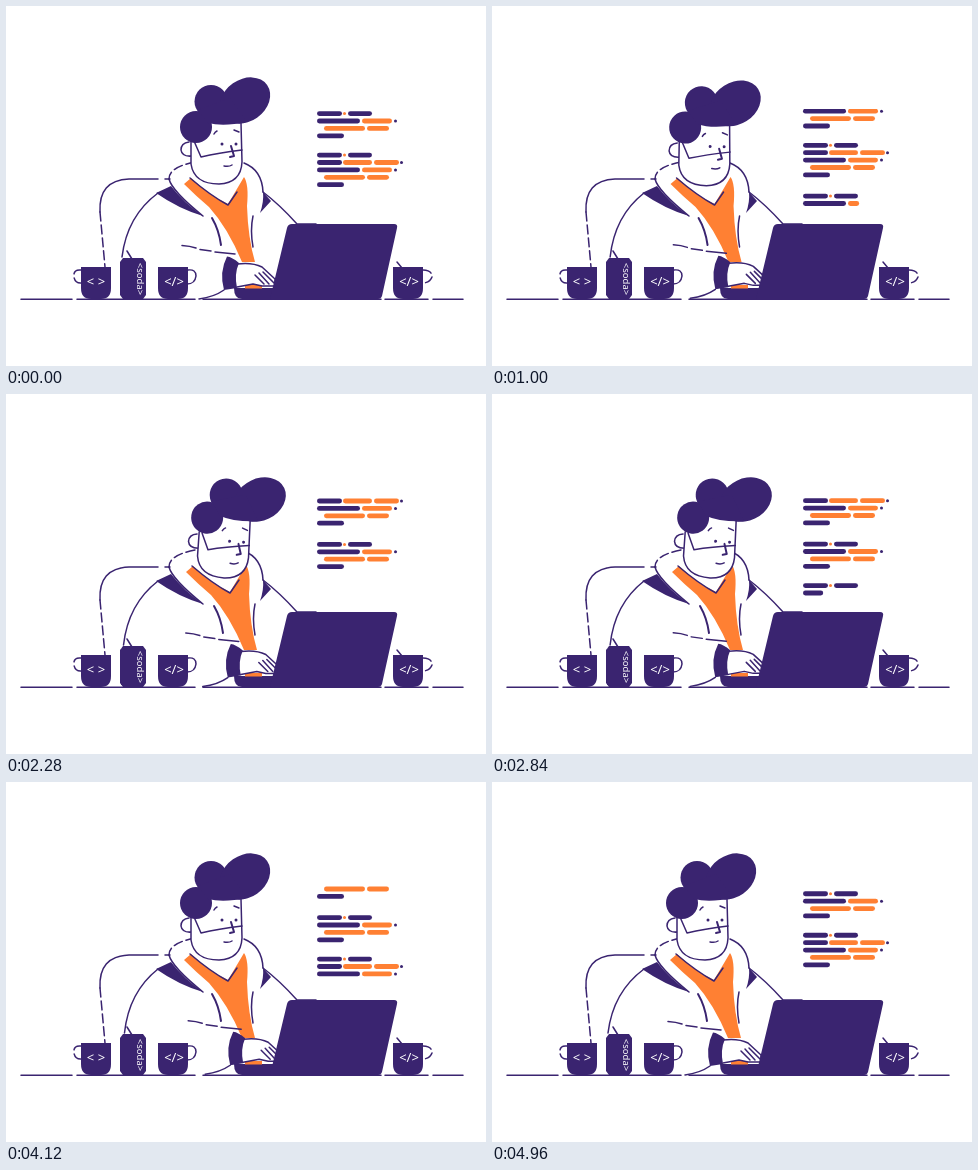
Animation, 480 px wide and 360 px high, one loop 5000 ms. Source, as an HTML page:

```html
<!DOCTYPE html>
<html lang="en">
<head>
<meta charset="utf-8">
<title>Coding at the desk</title>
<style>
  html, body { margin: 0; width: 100%; height: 100%; overflow: hidden; background: #fff; }
  svg { display: block; width: 100vw; height: 100vh; }
  .line { fill: none; stroke: #3a2470; stroke-width: 1.5; stroke-linecap: round; stroke-linejoin: round; }
  .bold { stroke-width: 2; }
  .skin { fill: #fff; }
  .dark { fill: #3a2470; }
  .warm { fill: #ff8033; }
  .gaps { stroke-dasharray: 9 4; }
  text { fill: #fff; font-family: "Noto Sans", "Open Sans", sans-serif; text-anchor: middle; }
</style>
</head>
<body>
<svg viewBox="0 0 480 360">
  <defs>
    <clipPath id="pane"><rect x="300" y="103" width="110" height="115"/></clipPath>
    <path id="cup" d="M0 0H30V21Q30 32 20 32H10Q0 32 0 21Z"/>
  </defs>

  <g clip-path="url(#pane)"><g id="code"></g></g>

  <!-- chair and desk -->
  <path class="line" d="M94 206C93 185 102 174 123 173H152M159 173H164"/>
  <path class="line gaps" d="M94 206L99 261"/>
  <path class="line" d="M15 293.300H66M71 293.300H189M197 293.300H375M379 293.300H422M427 293.300H457"/>

  <!-- jacket -->
  <path id="back" class="line"/>
  <path class="line" d="M257 186Q274 199 291 218H310"/>
  <path class="dark" d="M150 187L165 180Q178 197 197 210Q173 203 150 187Z"/>
  <path class="dark" d="M257 186L265 195L254 207Q258 196 257 186Z"/>
  <g id="chest">
    <path class="warm" d="M178 178L185 172Q204 190 222 198L238 171Q243 178 241 200Q242 232 249 256H236Q222 222 203 201Q190 190 178 178Z"/>
    <path class="line" d="M184 172Q205 190 222 199L231 186"/>
    <path class="line bold" d="M206 212Q213 224 215 239"/>
    <path class="line" d="M247 210Q244 224 247 241"/>
  </g>
  <path class="line gaps" d="M189 156Q163 161 163 173"/>
  <path class="line" d="M163 173Q166 185 197 210M238 157Q256 164 257 186"/>

  <g id="face">
    <path class="line skin" style="fill:#fff" d="M183 136Q175 137 175 144Q176 151 186 150"/>
    <path class="line" style="fill:#fff" d="M185 134V158Q188 178 213 178Q235 177 236 156L235 117"/>
    <path class="line" d="M188 135L195 151Q212 147 236 144"/>
    <g id="look">
      <path class="line" d="M208 128Q209 126 211 125M228 124L233 126M218 160Q223 161 226 159"/>
      <path class="line bold" d="M225 140L228 150L224 151"/>
      <circle class="dark" cx="216" cy="138" r="1.5"/>
      <circle class="dark" cx="230" cy="138" r="1.5"/>
    </g>
  </g>
  <g id="hair" class="dark">
    <circle cx="190" cy="121" r="16"/>
    <circle cx="205" cy="95.5" r="16.5"/>
    <ellipse cx="239" cy="94.500" rx="27" ry="21" transform="rotate(-35 239 94.500)"/>
    <path d="M192 104L224 92L241 116Q217 121 202 117Z"/>
  </g>

  <!-- laptop base sits below the hand -->
  <path class="dark" d="M228 282H270V293H236Q228 293 228 282Z"/>
  <path class="warm" d="M239 279H256V282.5H239Z"/>
  <g id="arm">
    <path class="skin" d="M190 243L221 249L218 284L196 292Z"/>
    <path class="line" d="M176 239.500Q184 240 190 242M194 243.500L205 245M209 246L229 248"/>
    <path class="line" d="M218 284Q208 291 193 293"/>
    <path class="line" style="fill:#fff" d="M231 258Q246 256 256 261L269 273V280H256L247 278L231 281"/>
    <path class="line" d="M249 269L258 278M253 267L263 278M257 266L268 277"/>
    <path class="dark" d="M221 250.500Q226 251 233 257Q228 268 231 282L218 284Q213 266 221 250.500Z"/>
  </g>
  <path class="dark" d="M286 218H388Q392 218 391 222L376 290Q375 293 372 293H264L281 222Q282 218 286 218Z"/>

  <!-- drinks -->
  <path class="line gaps" d="M75 264Q67 263 68 271Q69 278 77 277"/>
  <path class="line" d="M182 264Q190 263 190 270Q189 278 181 278M391 256L396 262M121 245L126 253"/>
  <path class="line gaps" d="M417 264Q426 264 426 271Q424 277 416 277"/>
  <use href="#cup" class="dark" x="75" y="261"/>
  <use href="#cup" class="dark" x="152" y="261"/>
  <use href="#cup" class="dark" x="387" y="261"/>
  <path class="dark" d="M117 252H137L140 256V289L137 293H117L114 289V256Z"/>
  <text x="90" y="280" font-size="13">&lt; &gt;</text>
  <text x="168" y="280" font-size="13">&lt;/&gt;</text>
  <text x="403" y="280" font-size="13">&lt;/&gt;</text>
  <text font-size="9.5" transform="translate(131 273) rotate(90)">&lt;soda&gt;</text>
</svg>
<script>
const LOOP = 5000, PERIOD = 92.3, ROW = 7.4;
const DARK = '#3a2470', WARM = '#ff8033';
const $ = id => document.getElementById(id);
const move = (id, value) => $(id).setAttribute('transform', value);
const ease = u => { u = Math.min(1, Math.max(0, u)); return u * u * (3 - 2 * u); };

// each bar: left, right, colour
const HEAD = [[311, 336, DARK], [337, 340, WARM], [342, 366, DARK]];
const LONG = [[311, 336, DARK], [337, 366, WARM], [368, 393, WARM], [394, 397, DARK]];
const MID = [[311, 354, DARK], [356, 386, WARM], [388, 391, DARK]];
const INNER = [[318, 359, WARM], [361, 383, WARM]];
const CLOSE = [[311, 338, DARK]];

// top of block, its rows, and when each row is typed
const BLOCKS = [
  [107.7, [HEAD, MID, INNER, CLOSE], [[200, 600], [650, 1150], [1480, 1780], [1820, 2000]]],
  [149.2, [HEAD, LONG, MID, INNER, CLOSE],
    [[2250, 2650], [2740, 3170], [3500, 3940], [4150, 4400], [4600, 4760]]]
];
// start, duration, distance
const SCROLLS = [[1200, 280, 14], [2000, 300, 26], [3190, 300, 14.5], [4400, 200, 11.8], [4783, 374, 26]];

const bars = [];

function addBar(y, [left, right, colour], from, to, typing) {
  const el = document.createElementNS('http://www.w3.org/2000/svg', 'line');
  const cap = Math.min(2.4, (right - left) / 2);
  const attrs = {
    x1: left + cap, x2: right - cap + 0.001, y1: y, y2: y,
    stroke: colour, 'stroke-width': cap * 2, 'stroke-linecap': 'round'
  };
  for (const key in attrs) el.setAttribute(key, attrs[key]);
  $('code').append(el);
  if (typing) bars.push({ el, left, right, cap, from, to, typing });
}

for (const copy of [0, 1])
  for (const [top, rows, times] of BLOCKS)
    rows.forEach((row, i) => row.forEach(bar =>
      addBar(top + i * ROW + copy * PERIOD, bar, row[0][0], row[row.length - 1][1], copy && times[i])));

const travel = t => SCROLLS.reduce((sum, [start, span, dist]) =>
  sum + dist * (ease((t - start) / span) + ease((t + LOOP - start) / span)), 0);
const travel0 = travel(0);

function type(t) {
  for (const { el, left, right, cap, from, to, typing: [start, end] } of bars) {
    const u = Math.min(1, (t - start) / (end - start));
    const tip = Math.min(right, from + (to - from) * u);
    const shown = tip >= left + cap * 2 - 0.01;
    el.style.display = shown ? '' : 'none';
    if (shown) el.setAttribute('x2', tip - cap + 0.001);
  }
}

function draw(t) {
  move('code', `translate(0 ${travel0 - travel(t)})`);
  type(t);

  // the face turns less than the hair, its features sink a little more
  const lean = ease((t - 740) / 750) - ease((t - 3160) / 750);
  move('hair', `translate(${1.5 * lean} ${-lean}) rotate(${9.5 * lean} 173 181)`);
  move('face', `translate(${7 * lean} ${6 * lean}) rotate(${4 * lean} 213 150)`);
  move('look', `translate(0 ${3 * lean})`);
  move('chest', `translate(${2 * lean} 0)`);

  const beat = t / 1250 % 1;
  const reach = 9.5 * (ease((beat - 0.08) / 0.36) - ease((beat - 0.7) / 0.22));
  move('arm', `translate(${reach} ${-reach * 0.12})`);
  $('back').setAttribute('d', `M152 187Q${121 + reach * 0.3} 210 ${116 + reach * 0.4} 251`);
}

const began = performance.now();
function tick() {
  draw((performance.now() - began) % LOOP);
  requestAnimationFrame(tick);
}
draw(0);
requestAnimationFrame(tick);
</script>
</body>
</html>
```
